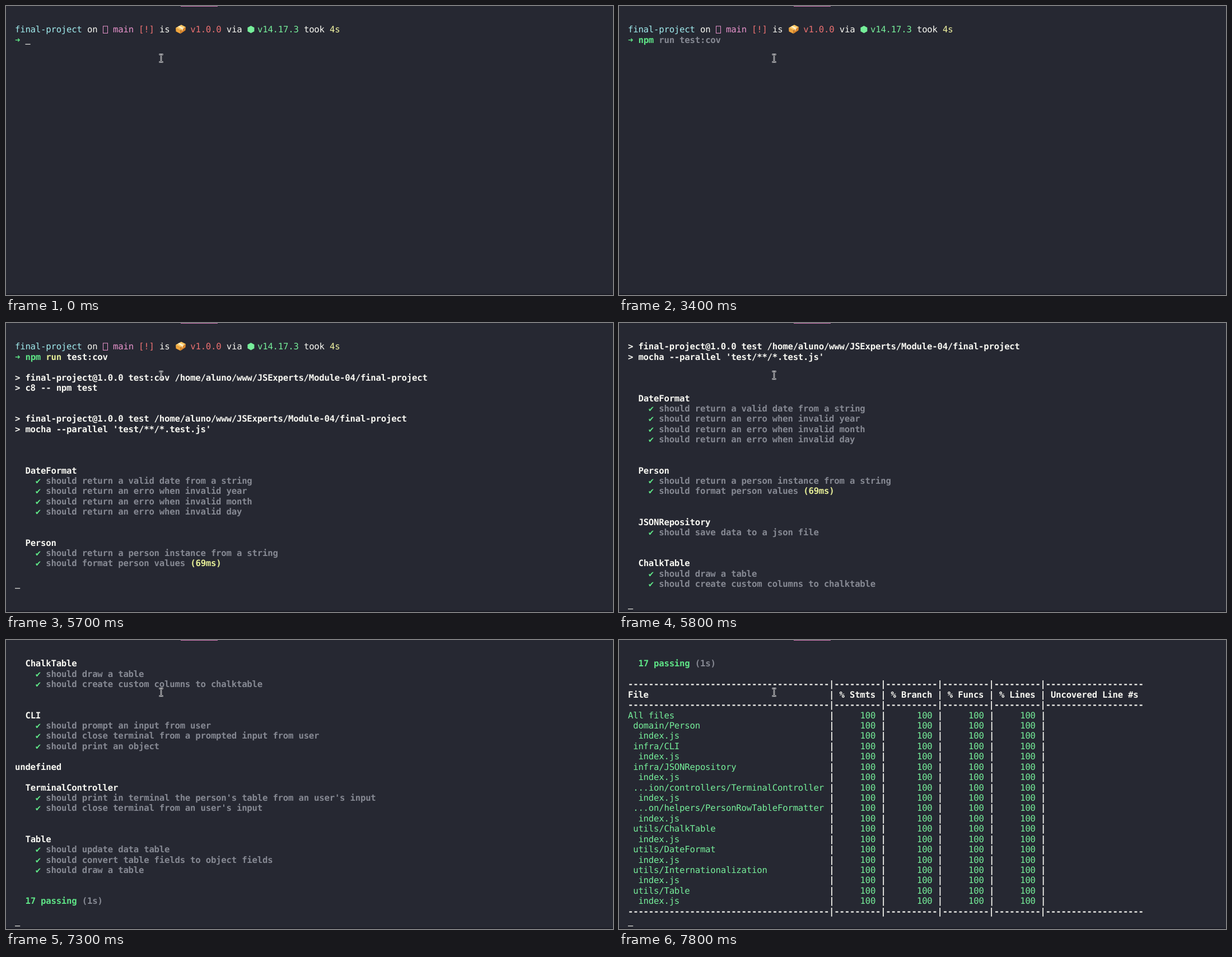
Animation, 1084 px wide and 516 px high, one loop 8 s. Source, as an HTML page:

```html
<!DOCTYPE html>
<html lang="en">
<head>
<meta charset="utf-8">
<title>Terminal test run</title>
<style>
  html, body { margin: 0; width: 100%; height: 100%; overflow: hidden; background: #262832; }
  svg { display: block; }
  /* Slightly tight spacing keeps glyphs on the 9.213px terminal grid. */
  text {
    font: 15.65px "DejaVu Sans Mono", monospace;
    letter-spacing: -0.209px;
    white-space: pre;
    text-rendering: geometricPrecision;
  }
  .bold { font-weight: bold; }
</style>
</head>
<body>
<svg id="stage" width="1084" height="516" viewBox="0 0 1084 516">
  <rect width="1084" height="516" fill="#262832"/>
  <rect x="312" width="66" height="1" fill="#d67bb8"/>
  <rect y="514" width="1084" height="2" fill="#1b1c25"/>
  <g id="screen"></g>
  <rect id="caret" width="9.2" height="1.1" fill="#f8f8f2"/>
  <g id="pointer" fill="none">
    <path d="M273.5 86.5h2.5l1 1 1-1h2.5M277 87.5v12M273.5 100h2.5l1-1 1 1h2.5" stroke="#f0f0f0" stroke-width="2.5"/>
    <path d="M274 86.5h2l1 1 1-1h2M277 87.5v12M274 100h2l1-1 1 1h2" stroke="#22232b" stroke-width="0.9"/>
  </g>
</svg>
<script>
const DURATION = 8000;
const LEFT = 16, CELL = 9.213, PITCH = 18.43;
const BASELINE = 28.94, UNDERLINE = 30.89, LAST_ROW = 26;

const COLOR = {
  white: '#f8f8f2', dim: '#868993', cyan: '#a1ecee', pink: '#e893cc',
  red: '#ec7171', green: '#76ee9a', yellow: '#f3f5a2',
  brightGreen: '#5fe587', brightYellow: '#e6ee97'
};

const screen = document.getElementById('screen');
const caret = document.getElementById('caret');

function add(parent, tag, attrs = {}) {
  const node = document.createElementNS('http://www.w3.org/2000/svg', tag);
  for (const key in attrs) node.setAttribute(key, attrs[key]);
  parent.append(node);
  return node;
}

const xAt = col => LEFT + col * CELL;

function write(parent, { col, text, color, bold }) {
  const node = add(parent, 'text', { x: xAt(col), y: BASELINE, fill: COLOR[color] });
  if (bold) node.setAttribute('class', 'bold');
  node.textContent = text;
  return node;
}

const plain = (col, text, color = 'white') => ({ col, text, color, bold: false });
const strong = (col, text, color = 'white') => ({ col, text, color, bold: true });

// Transcript: each line is a list of text runs.
const suite = (name, ...tests) => [
  [strong(2, name)],
  ...tests.map(test => [strong(4, '✔', 'brightGreen'), strong(6, test, 'dim')]),
  [], []
];

const widths = [39, 9, 10, 9, 9, 19];
const bars = [39, 49, 60, 70, 80];
const rule = [strong(0, widths.map(w => '-'.repeat(w)).join('|'))];
const header = [strong(0, ['File', ' % Stmts', ' % Branch', ' % Funcs', ' % Lines', ' Uncovered Line #s']
  .map((label, i) => label.padEnd(widths[i])).join('|'))];
const coverageRow = name => [
  plain(0, name, 'green'),
  ...bars.map(col => strong(col, '|')),
  ...bars.slice(1).map(col => plain(col - 4, '100', 'green'))
];
const folders = [
  'domain/Person', 'infra/CLI', 'infra/JSONRepository',
  '...ion/controllers/TerminalController', '...on/helpers/PersonRowTableFormatter',
  'utils/ChalkTable', 'utils/DateFormat', 'utils/Internationalization', 'utils/Table'
];

const path = '/home/aluno/www/JSExperts/Module-04/final-project';
const personSuite = suite('Person',
  'should return a person instance from a string', 'should format person values');
personSuite[2].push(strong(34, '(69ms)', 'brightYellow'));

const lines = [
  [],
  [
    plain(0, 'final-project', 'cyan'), plain(14, 'on'), plain(19, 'main', 'pink'),
    plain(24, '[!]', 'red'), plain(28, 'is'), plain(34, 'v1.0.0', 'red'), plain(41, 'via'),
    plain(47, 'v14.17.3', 'green'), plain(56, 'took'), plain(61, '4s', 'yellow')
  ],
  [strong(0, '➜', 'brightGreen')],
  [],
  [strong(0, '> final-project@1.0.0 test:cov ' + path)],
  [strong(0, '> c8 -- npm test')],
  [], [],
  [strong(0, '> final-project@1.0.0 test ' + path)],
  [strong(0, "> mocha --parallel 'test/**/*.test.js'")],
  [], [], [],
  ...suite('DateFormat',
    'should return a valid date from a string',
    'should return an erro when invalid year',
    'should return an erro when invalid month',
    'should return an erro when invalid day'),
  ...personSuite,
  ...suite('JSONRepository', 'should save data to a json file'),
  ...suite('ChalkTable', 'should draw a table', 'should create custom columns to chalktable'),
  ...suite('CLI',
    'should prompt an input from user',
    'should close terminal from a prompted input from user',
    'should print an object').slice(0, -1),
  [strong(0, 'undefined')],
  [],
  ...suite('TerminalController',
    "should print in terminal the person's table from an user's input",
    "should close terminal from an user's input"),
  ...suite('Table',
    'should update data table',
    'should convert table fields to object fields',
    'should draw a table'),
  [strong(2, '17 passing', 'brightGreen'), strong(13, '(1s)', 'dim')],
  [],
  rule, header, rule,
  coverageRow('All files'),
  ...folders.flatMap(name => [coverageRow(' ' + name), coverageRow('  index.js')]),
  rule
];

const rows = lines.map((runs, i) => {
  const row = add(screen, 'g', { transform: `translate(0 ${i * PITCH})` });
  runs.forEach(run => write(row, run));
  return row;
});

// Prompt icons: missing glyph, package and hexagon.
const icons = add(rows[1], 'g', { transform: `translate(0 ${-PITCH})` });
add(icons, 'rect', { x: 173.5, y: 36, width: 8, height: 12.5, fill: 'none', stroke: COLOR.pink });
[
  ['M303 39L313 33.5L321 37.5L311.5 43.5Z', '#ffc864'],
  ['M303 39L311.5 43.5V49.5L303.5 45.5Z', '#f0a43c'],
  ['M311.5 43.5L321 37.5L320.5 43.5L311.5 49.5Z', '#d9852b'],
  ['M307 36.8L309.5 35.4L318 39.4L315.5 41V43.5L314 44V41.5Z', '#fff0c8'],
  ['M437.4 35.3L443.4 38.6V45.3L437.4 48.6L431.4 45.3V38.6Z', COLOR.green]
].forEach(([d, fill]) => add(icons, 'path', { d, fill }));

// Command line parts, rewritten as the user types.
const command = write(rows[2], strong(2, '', 'brightGreen'));
const subcommand = write(rows[2], strong(6, '', 'brightYellow'));
const argument = write(rows[2], strong(10, ''));
const suggestion = write(rows[2], strong(6, '', 'dim'));

const typing = [
  [0, ''], [900, 'npm start'], [2000, 'npm star'], [2200, 'npm sta'], [2400, 'npm st'],
  [2500, 'npm s'], [2800, 'npm '], [3600, 'npm run test:cov']
];
// Time and number of lines printed so far, which is also the caret's line.
const printed = [
  [0, 2], [3900, 3], [4300, 7], [4700, 11], [5100, 12], [5500, 13], [5700, 24],
  [5800, 33], [5900, 39], [6000, 51], [6100, 54], [7700, 66], [7800, 77]
];
const caretHidden = [[200, 800], [1500, 2000], [3400, 3600], [6700, 7300]];

const within = (t, [from, to]) => t >= from && t < to;
const valueAt = (steps, t) => steps.filter(([start]) => start <= t).pop()[1];

function render(t) {
  const typed = valueAt(typing, t);
  const [first, second = '', third = ''] = typed.split(' ');
  command.textContent = first;
  subcommand.textContent = second;
  argument.textContent = third;
  suggestion.textContent = within(t, [2800, 3600]) ? 'run test:cov' : '';

  const caretLine = valueAt(printed, t);
  const scroll = Math.max(0, caretLine - LAST_ROW);
  screen.setAttribute('transform', `translate(0 ${-scroll * PITCH})`);
  rows.forEach((row, i) => {
    const visible = i >= scroll && (i < caretLine || i === 2);
    row.setAttribute('display', visible ? 'inline' : 'none');
  });

  caret.setAttribute('x', xAt(caretLine === 2 ? 2 + typed.length : 0));
  caret.setAttribute('y', UNDERLINE + (caretLine - scroll) * PITCH);
  caret.setAttribute('display', caretHidden.some(span => within(t, span)) ? 'none' : 'inline');
}

const start = performance.now();
function tick() {
  render((performance.now() - start) % DURATION);
  requestAnimationFrame(tick);
}
tick();
</script>
</body>
</html>
```
